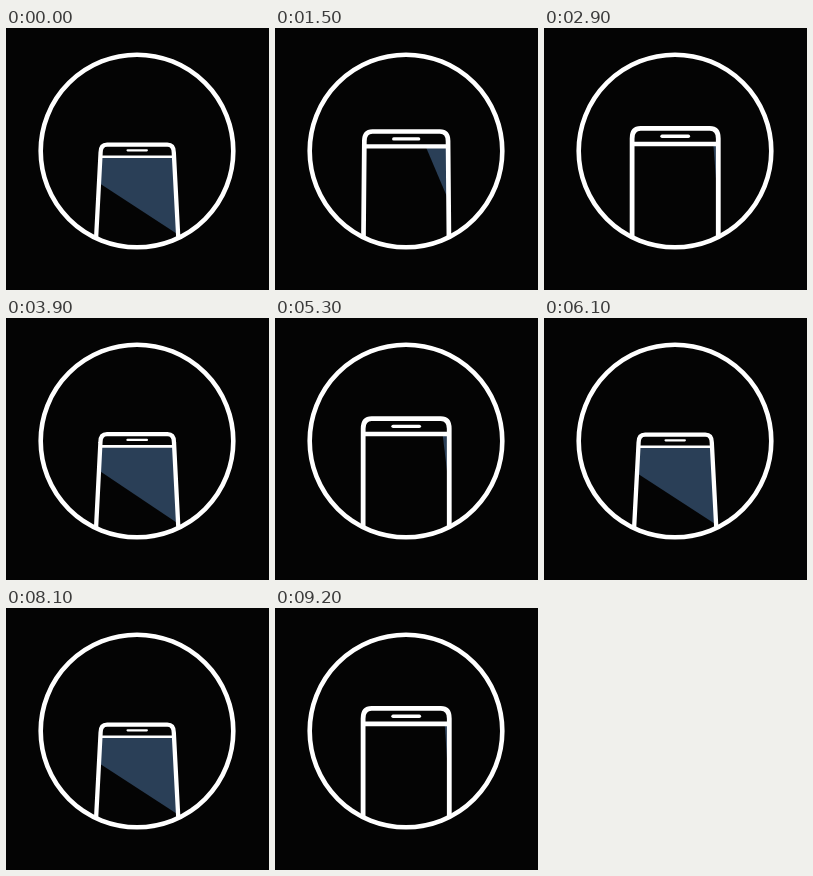
An HTML page that plays this animation: 263x262 px, repeating every 9.3 s.

```html
<!DOCTYPE html>
<html lang="en">
<head>
<meta charset="utf-8">
<title>Tilting phone</title>
<style>
  html, body { margin: 0; width: 100%; height: 100%; overflow: hidden; background: #040404; }
  svg { display: block; width: 100vw; height: 100vh; }
</style>
</head>
<body>
<svg viewBox="0 0 263 262" preserveAspectRatio="none">
  <defs>
    <clipPath id="disc"><circle cx="131" cy="123" r="96"/></clipPath>
    <clipPath id="glass"><path id="screen"/></clipPath>
  </defs>
  <g clip-path="url(#disc)">
    <g clip-path="url(#glass)"><path id="shine" fill="#2a3f57"/></g>
    <g fill="none" stroke="#fff">
      <path id="body"/>
      <path id="bar"/>
      <path id="speaker" stroke-linecap="round"/>
    </g>
  </g>
  <circle cx="131" cy="123" r="96.3" fill="none" stroke="#fff" stroke-width="4.6"/>
</svg>
<script>
const LOOP = 9300, PERIOD = 2000, UPRIGHT = 1065, CX = 131.2;
const el = id => document.getElementById(id);
const mix = (a, b, k) => a + (b - a) * k;

function set(id, d, width) {
  el(id).setAttribute('d', d);
  if (width) el(id).setAttribute('stroke-width', width);
}

// 0 = upright, 1 = leaning back
function tiltAt(t) {
  const p = (((t - UPRIGHT) % PERIOD) + PERIOD) % PERIOD / PERIOD;
  const x = p < 0.5 ? p * 2 : 2 - p * 2;
  return x < 0.5 ? 4 * x ** 3 : 1 - 4 * (1 - x) ** 3;
}

function draw(t) {
  const s = tiltAt(t), u = s ** 1.5;
  const top = mix(100.4, 116.6, u);
  const half = mix(43.1, 36.6, u);
  const foot = mix(43.1, 41.2, u);
  const rx = mix(8.5, 6.5, u), ry = mix(10, 8, u);
  const bar = mix(115.9, 128.7, u);
  const spk = mix(108.2, 122.3, u), spkHalf = mix(13.2, 9.6, u);
  const base = 212;
  const shoulder = top + ry;
  const side = y => mix(half, foot, (y - shoulder) / (base - shoulder));

  set('body',
    `M${CX - foot} ${base}L${CX - half} ${shoulder}` +
    `Q${CX - half} ${top} ${CX - half + rx} ${top}` +
    `H${CX + half - rx}Q${CX + half} ${top} ${CX + half} ${shoulder}` +
    `L${CX + foot} ${base}`, mix(4.8, 4.3, u));

  const b = side(bar);
  set('bar', `M${CX - b} ${bar}H${CX + b}`, mix(4.6, 2.6, u));
  set('speaker', `M${CX - spkHalf} ${spk}H${CX + spkHalf}`, mix(3.4, 2.3, u));
  set('screen', `M${CX - b} ${bar}H${CX + b}L${CX + foot} ${base}H${CX - foot}Z`);

  // edge of the reflection swings around a point on the right side
  const a = mix(87, 33, s ** 0.9) * Math.PI / 180;
  const qx = 172, qy = mix(150, 206.5, s);
  const px = qx - 200 * Math.cos(a), py = qy - 200 * Math.sin(a);
  set('shine', `M${qx} ${qy}L${px} ${py}V-200H300V${qy}Z`);
}

const start = performance.now();
function frame() {
  draw((performance.now() - start) % LOOP);
  requestAnimationFrame(frame);
}
draw(0);
requestAnimationFrame(frame);
</script>
</body>
</html>
```
